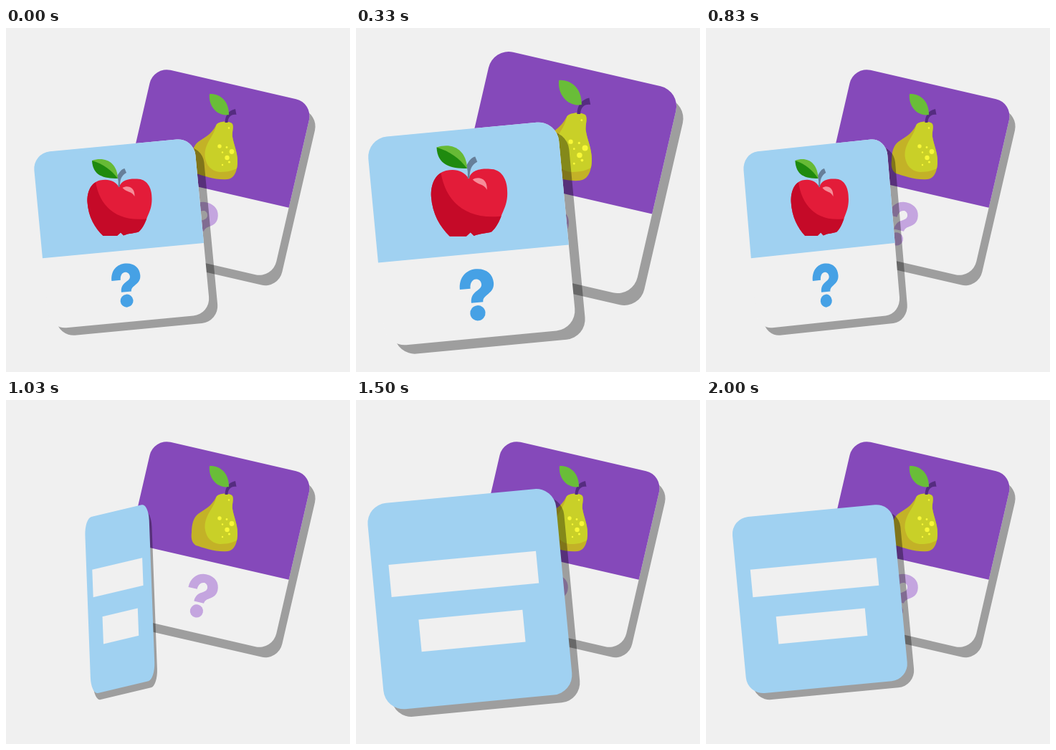
Animation, 480 px wide and 480 px high, one loop 3630 ms. Source, as an HTML page:

```html
<!DOCTYPE html>
<html lang="en">
<head>
<meta charset="utf-8">
<title>Flash cards</title>
<style>
  html, body { margin: 0; width: 100%; height: 100%; overflow: hidden; background: #f0f0f0; }
  svg { display: block; width: 100%; height: 100%; }
</style>
</head>
<body>
<svg viewBox="0 0 480 480">
  <defs>
    <rect id="card" x="-113" y="-123" width="226" height="247" rx="24"/>
    <path id="cardTop" d="M-113 24.300V-99a24 24 0 0 1 24-24H89a24 24 0 0 1 24 24V24.300Z"/>
    <g id="question" fill="currentColor">
      <path d="M-20 65C-20 50-10 42.500 1 42.500C13 42.500 20.500 50 20.500 60.500C20.500 74 6 73 6 82H-8C-8 67 6 69 6 61C6 57 3 54.500 0 54.500C-4 54.500-7.500 58-7.500 65Z"/>
      <circle cx="-1.500" cy="94.500" r="9"/>
    </g>
    <path id="appleShape" d="M158 222C152 213 143 210 131 212.500C118 216 113 229 113.500 243C115 264 124 279 135.500 290H155L160 285.500L164 289.500C172 286 178 287 185 284.500C190 280 194 273 197 264C201 255 203.500 249 203.500 239C204 222 196 210.500 183 210.500C173 210 161 211 158 222Z"/>
    <clipPath id="appleClip"><use href="#appleShape"/></clipPath>
    <path id="pearShape" d="M293 136C295 130 312 129 316 134C318 139 315 146 316 152C318 164 323 173 323 186C323 199 319 210 309 211C295 213 275 206 265 203C259 199 258 192 259 185C259 172 262 164 268 159C278 152 286 149 293 136Z"/>
    <clipPath id="pearClip"><use href="#pearShape"/></clipPath>
  </defs>

  <g id="pearCard">
    <g transform="translate(289 201) rotate(13) scale(1.010 1.018)">
      <use href="#card" x="11" y="12" opacity=".345"/>
      <use href="#card" fill="#f0f0f0"/>
      <use href="#cardTop" fill="#8549ba"/>
      <use href="#question" color="#c4a5df"/>
    </g>
    <use href="#pearShape" fill="#c3b227"/>
    <path clip-path="url(#pearClip)" fill="#c9d028" d="M294 128C294 150 278 156 277.500 177C278 192 288 201 300 201C310 201 318 199 325 194V128Z"/>
    <g id="spots" fill="#f8f838"></g>
    <path fill="#552c80" d="M305.500 132C306 121 311 115 320 113L321.500 121C314 120 310 124 309.500 132Z"/>
    <path fill="#69bd38" d="M284 92C297 91 311 100 311 121C296 124 282 110 284 92Z"/>
  </g>

  <g id="appleCard">
    <g transform="translate(161.200 286.400) rotate(-5.400)">
      <use href="#card" x="11" y="11.500" opacity=".345"/>
      <use href="#card" fill="#f0f0f0"/>
      <use href="#cardTop" fill="#a0d1f1"/>
      <use href="#question" color="#46a1e5"/>
    </g>
    <use href="#appleShape" fill="#e31c39"/>
    <path clip-path="url(#appleClip)" fill="#c50a28" d="M124 205C126 243 150 275 205 265V295H105V205Z"/>
    <path fill="#f68d99" d="M162.500 223C169 219 180 221 179.500 235C175 227 169 230 162.500 223Z"/>
    <path fill="#667f99" d="M155 207C158 201 161 197 165.500 196L168 202C161 206 159 211 159 221L156.500 222C157 216 157 211 155 207Z"/>
    <path fill="#67ba35" d="M120 185C138 179 155 187 156 210L136 200Z"/>
    <path fill="#1f8a0e" d="M120 185C121 206 136 210 156 210C147 198 136 190 120 185Z"/>
  </g>

  <g id="blankCard">
    <g transform="translate(158.800 277.100) rotate(-5.400)">
      <use href="#card" x="8.500" y="10" opacity=".345"/>
      <use href="#card" fill="#a0d1f1"/>
      <path fill="#f0f0f0" d="M-92.800-49.200H83.900V-10.600H-92.800ZM-63.200 19.200H61.400V57.800H-63.200Z"/>
    </g>
  </g>
</svg>
<script>
  const LOOP = 3630, LAST_STEP = 60;
  const pearCard = document.getElementById('pearCard');
  const appleCard = document.getElementById('appleCard');
  const blankCard = document.getElementById('blankCard');

  document.getElementById('spots').innerHTML = [
    [298, 165, 2.7], [315, 172.5, 3.4], [308.5, 181, 3.2], [308, 166.5, 1.4],
    [302, 173.5, 1.2], [311.5, 187, 1.6], [302, 191, 1.2], [311, 139.5, 1.2]
  ].map(([x, y, r]) => `<circle cx="${x}" cy="${y}" r="${r}"/>`).join('');

  const progress = (n, from, to) => Math.min(1, Math.max(0, (n - from) / (to - from)));
  const linear = p => p;
  const easeInOut = p => (1 - Math.cos(Math.PI * p)) / 2;

  // Swells to 1.2 at the peak and returns to 1.
  const pulse = (n, start, peak, end, ease) =>
    1 + 0.2 * ease(n < peak ? progress(n, start, peak) : 1 - progress(n, peak, end));

  function place(card, x, y, scale, turn = 1) {
    card.style.display = turn > 0 ? '' : 'none';
    card.setAttribute('transform',
      `translate(${x} ${y}) scale(${scale * turn} ${scale}) translate(${-x} ${-y})`);
  }

  function draw(ms) {
    // The motion advances 30 steps per second.
    const n = Math.min(LAST_STEP, Math.floor(ms * 0.03 + 0.15));
    place(pearCard, 289, 201, pulse(n, 0, 11.4, 25, linear));
    place(appleCard, 161.2, 286.4, pulse(n, 0, 11, 24, linear), 1 - easeInOut(progress(n, 24, 28.7)));
    place(blankCard, 158.8, 277.1, pulse(n, 35, 48.5, 60, easeInOut), easeInOut(progress(n, 28.7, 34)));
  }

  const startTime = performance.now();
  function tick() {
    draw((performance.now() - startTime) % LOOP);
    requestAnimationFrame(tick);
  }
  tick();
</script>
</body>
</html>
```
